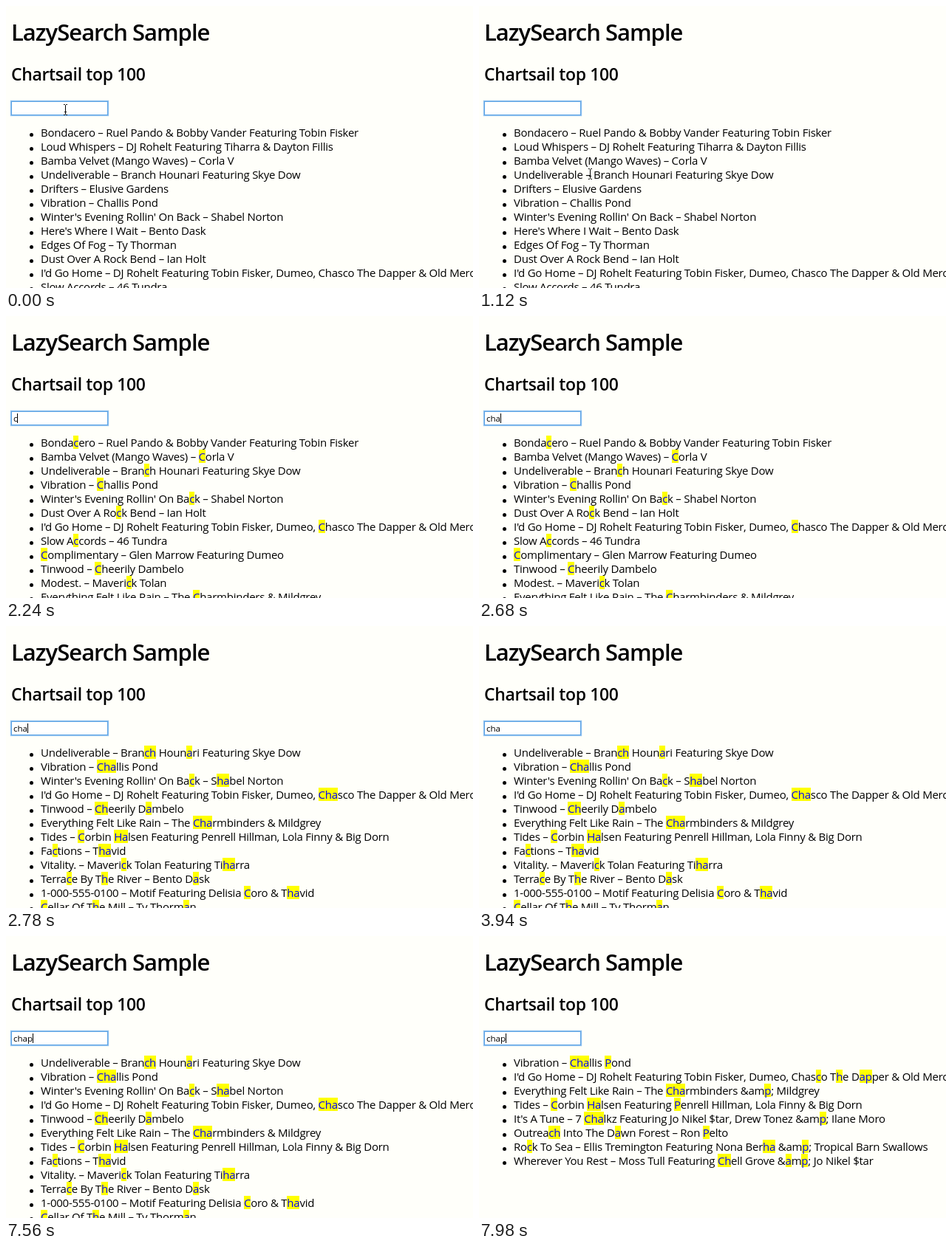
An HTML page for the animation above (8 s loop, 632 by 382 pixels).

```html
<!DOCTYPE html>
<html lang="en">
<head>
<meta charset="utf-8">
<title>LazySearch Sample</title>
<style>
  html, body { margin: 0; width: 100%; height: 100%; overflow: hidden; }
  body {
    position: relative;
    background: #fffffa;
    color: #000;
    font: 15px/19px "Open Sans", "Noto Sans", sans-serif;
    white-space: nowrap;
  }
  h1, h2, ul, #box, #pointer { position: absolute; margin: 0; }
  h1 { left: 7px; top: 15px; font-size: 31px; line-height: 40px; font-weight: 600; letter-spacing: -1px; }
  h2 { left: 7px; top: 77px; font-size: 23px; line-height: 30px; font-weight: 600; letter-spacing: -.35px; }
  ul { left: 47px; top: 162px; padding: 0; list-style: none; letter-spacing: -.25px; }
  li { position: relative; height: 19px; }
  li::before {
    content: "";
    position: absolute;
    left: -15.5px;
    top: 9.5px;
    width: 5px;
    height: 5px;
    border-radius: 50%;
    background: #000;
  }
  mark { color: #00f; background: linear-gradient(#ff0, #ff0) 0 70% / 100% 18px no-repeat; }
  #box {
    left: 8px;
    top: 130px;
    width: 127px;
    height: 17px;
    padding-left: 2px;
    display: flex;
    align-items: center;
    background: #fff;
    box-shadow: 0 0 0 1px #5ea4e4, 0 0 1px 2px #8fc0f0;
    font-size: 11.5px;
    line-height: 17px;
  }
  #caret { width: 1px; height: 13px; background: #000; }
  #pointer { left: -3.5px; top: -7.5px; width: 7px; height: 15px; }
</style>
</head>
<body>
<h1>LazySearch Sample</h1>
<h2>Chartsail top 100</h2>
<div id="box"><span id="typed"></span><i id="caret"></i></div>
<ul id="list"></ul>
<svg id="pointer" viewBox="0 0 7 15" fill="none" stroke="#000">
  <path d="M1 .5h1.5l1 1 1-1H6M3.5 1.5v12M1 14.5h1.5l1-1 1 1H6M2 10.5h3"/>
</svg>
<script>
const LOOP = 8000;
const songs = `Bondacero – Ruel Pando &amp; Bobby Vander Featuring Tobin Fisker
Loud Whispers – DJ Rohelt Featuring Tiharra &amp; Dayton Fillis
Bamba Velvet (Mango Waves) – Corla V
Undeliverable – Branch Hounari Featuring Skye Dow
Drifters – Elusive Gardens
Vibration – Challis Pond
Winter's Evening Rollin' On Back – Shabel Norton
Here's Where I Wait – Bento Dask
Edges Of Fog – Ty Thorman
Dust Over A Rock Bend – Ian Holt
I'd Go Home – DJ Rohelt Featuring Tobin Fisker, Dumeo, Chasco The Dapper &amp; Old Mercer
Slow Accords – 46 Tundra
Complimentary – Glen Marrow Featuring Dumeo
Tinwood – Cheerily Dambelo
Modest. – Maverick Tolan
Everything Felt Like Rain – The Charmbinders &amp; Mildgrey
Tides – Corbin Halsen Featuring Penrell Hillman, Lola Finny &amp; Big Dorn
Factions – Thavid
Vitality. – Maverick Tolan Featuring Tiharra
Terrace By The River – Bento Dask
1-000-555-0100 – Motif Featuring Delisia Coro &amp; Thavid
Cellar Of The Mill – Ty Thorman
It's A Tune – 7 Chalkz Featuring Jo Nikel $tar, Drew Tonez &amp; Ilane Moro
Outreach Into The Dawn Forest – Ron Pelto
Rock To Sea – Ellis Tremington Featuring Nona Berha &amp; Tropical Barn Swallows
Wherever You Rest – Moss Tull Featuring Chell Grove &amp; Jo Nikel $tar`.split("\n");

// Each entry: start time, value
const typing = [[0, ""], [2000, "c"], [2400, "ch"], [2500, "cha"], [7480, "chap"]];
const queries = [[0, ""], [2240, "c"], [2780, "cha"], [7720, "chap"]];
const carets = [[0, false], [2000, true], [3940, false], [5340, true], [6740, false], [7420, true]];
// Pointer path: time, x, y
const path = [[0, 80, 140], [350, 311, 200], [820, 232, 277], [1560, 4, 140], [1660, 4, 140], [1960, 80, 140]];
const POINTER_END = 2000;

const $ = id => document.getElementById(id);
const at = (track, t) => track.findLast(step => step[0] <= t)[1];

// Shortest in-order match of the query letters; returns their indices
function match(text, query) {
  const low = text.toLowerCase();
  let best = null;
  for (let i = low.indexOf(query[0]); i >= 0; i = low.indexOf(query[0], i + 1)) {
    const hits = [i];
    for (const ch of query.slice(1)) hits.push(low.indexOf(ch, hits.at(-1) + 1));
    const ordered = hits.every((h, k) => !k || h > hits[k - 1]);
    if (ordered && (!best || hits.at(-1) - i < best.at(-1) - best[0])) best = hits;
  }
  return best;
}

function rows(query) {
  return songs.map(song => {
    if (!query) return `<li>${song}</li>`;
    const hits = match(song, query);
    if (!hits) return "";
    const marked = [...song].map((ch, i) => hits.includes(i) ? `<mark>${ch}</mark>` : ch);
    return `<li>${marked.join("").replaceAll("</mark><mark>", "")}</li>`;
  }).join("");
}

function pointerAt(t) {
  const k = path.findIndex(p => p[0] > t);
  if (k < 0) return path.at(-1).slice(1);
  const [a, b] = [path[k - 1], path[k]];
  const u = (t - a[0]) / (b[0] - a[0]);
  const ease = u * u * (3 - 2 * u);
  return [1, 2].map(i => Math.round(a[i] + (b[i] - a[i]) * ease));
}

let shown = null;
function draw(t) {
  const query = at(queries, t);
  if (query !== shown) $("list").innerHTML = rows(shown = query);
  $("typed").textContent = at(typing, t);
  $("caret").style.visibility = at(carets, t) ? "visible" : "hidden";
  const [x, y] = pointerAt(t);
  $("pointer").style.transform = `translate(${x}px, ${y}px)`;
  $("pointer").style.visibility = t < POINTER_END ? "visible" : "hidden";
}

const start = performance.now();
function tick() {
  draw((performance.now() - start) % LOOP);
  requestAnimationFrame(tick);
}
tick();
</script>
</body>
</html>
```
